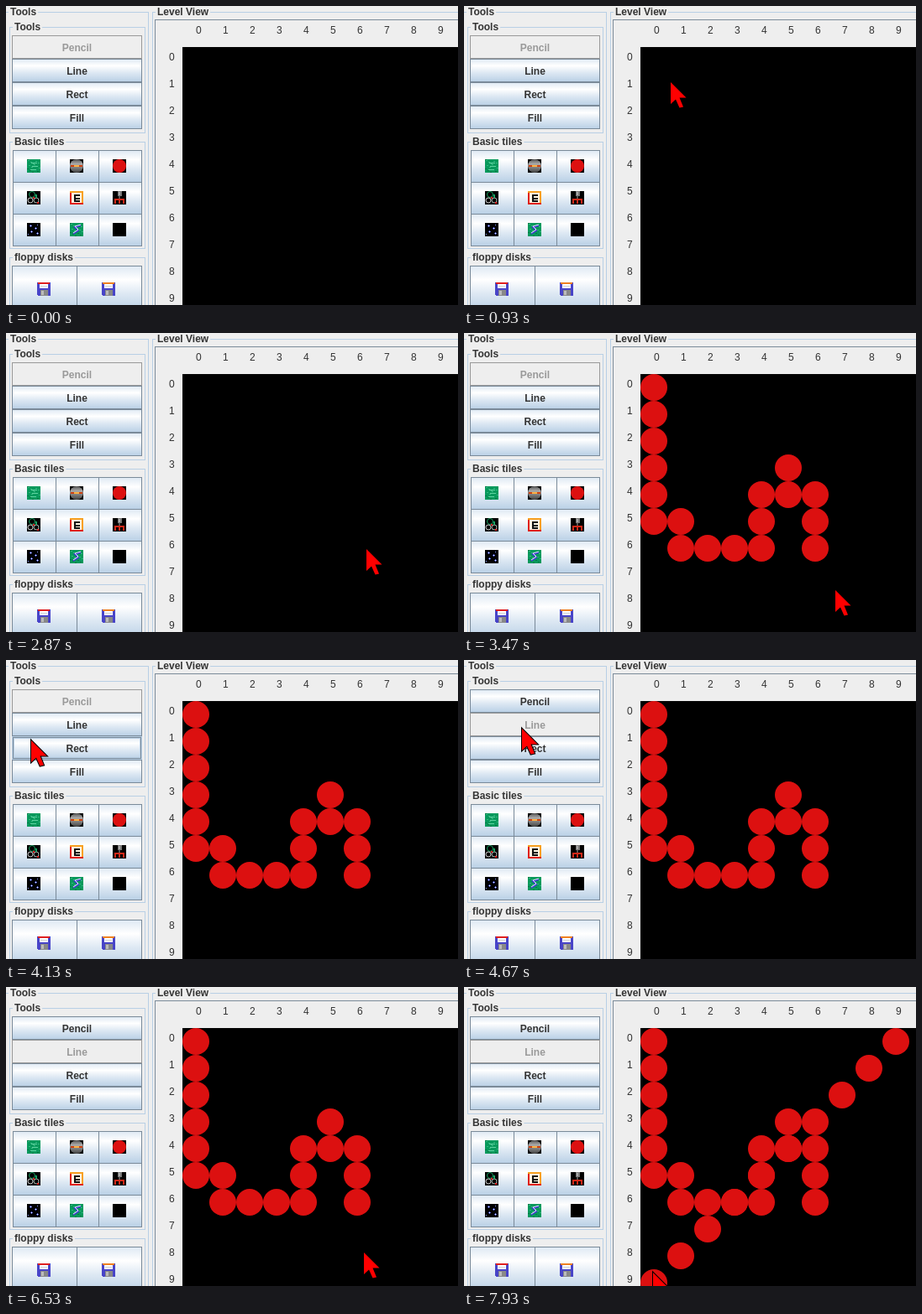
These frames come from a looping animation (538 by 357 pixels, 8 s). An HTML page with a canvas:

```html
<!DOCTYPE html>
<html lang="en">
<head>
<meta charset="utf-8">
<title>Level editor</title>
<style>
html, body { margin: 0; width: 100%; height: 100%; overflow: hidden; background: #eee; }
canvas { display: block; }
</style>
</head>
<body>
<canvas id="stage" width="538" height="357"></canvas>
<script>
const ctx = document.getElementById('stage').getContext('2d');
const LOOP = 8000, TICK = 1000 / 15;
const PALE = '#b8cfe5', EDGE = '#7a8a99', INK = '#333', DIM = '#999', RED = '#dc1010';
const FONT = '"Liberation Sans", Arial, sans-serif';

// Pointer path: tick, x, y; a key without a place holds the last one
const path = [
  [4, 412, 370], [8, 345, 236], [14, 246, 91], [17, 230, 77], [19],
  [22, 223, 132], [24, 224, 192], [27, 263, 253], [30, 320, 263], [32, 343, 253],
  [35, 351, 200], [38, 388, 176], [41, 423, 222], [43, 429, 258], [49],
  [52, 442, 307], [54], [58, 270, 214], [62, 30, 96], [67, 62, 78], [69],
  [72, 112, 96], [76, 350, 108], [81, 521, 57], [83],
  [88, 512, 140], [96, 469, 312], [98, 426, 317], [103, 332, 328], [109, 250, 339],
  [111, 241, 340], [113, 227, 341], [115, 225, 341]
];
path.forEach((p, i) => { if (p.length === 1) p.push(path[i - 1][1], path[i - 1][2]); });

const PENCIL_AT = 46, PRESS_AT = 69, SWITCH_AT = 70, LINE_AT = 119;
const pencilCells = '00 01 02 03 04 05 15 16 26 36 46 45 44 54 53 64 65 66'.split(' ');

const slope = (i, axis) => (path[i + 1][axis] - path[i][axis]) / (path[i + 1][0] - path[i][0]);

// Monotone tangent, so the curve never overshoots a key
function tangent(i, axis) {
  if (i === 0) return slope(0, axis);
  if (i === path.length - 1) return 0;
  const a = slope(i - 1, axis), b = slope(i, axis);
  return a * b > 0 ? 2 * a * b / (a + b) : 0;
}

function pointerAt(tick) {
  const next = path.findIndex(p => p[0] > tick);
  if (next < 0) return path[path.length - 1].slice(1);
  if (next === 0) return path[0].slice(1);
  const i = next - 1, span = path[next][0] - path[i][0];
  const u = (tick - path[i][0]) / span, v = 1 - u;
  return [1, 2].map(axis => Math.round(
    path[i][axis] * v * v * (1 + 2 * u) + path[next][axis] * u * u * (3 - 2 * u) +
    span * u * v * (tangent(i, axis) * v - tangent(next, axis) * u)
  ));
}

function fill(color, x, y, w, h) {
  ctx.fillStyle = color;
  ctx.fillRect(x, y, w, h);
}

function frame(color, x, y, w, h) {
  ctx.strokeStyle = color;
  ctx.lineWidth = 1;
  ctx.strokeRect(x + .5, y + .5, w - 1, h - 1);
}

function disc(color, x, y, r) {
  ctx.fillStyle = color;
  ctx.beginPath();
  ctx.arc(x, y, r, 0, Math.PI * 2);
  ctx.fill();
}

function ring(color, x, y, r) {
  ctx.strokeStyle = color;
  ctx.lineWidth = 1;
  ctx.beginPath();
  ctx.arc(x, y, r, 0, Math.PI * 2);
  ctx.stroke();
}

function text(str, x, y, weight = 'bold', color = INK, align = 'left') {
  ctx.font = `${weight} 12px ${FONT}`;
  ctx.textAlign = align;
  ctx.fillStyle = color;
  ctx.fillText(str, x, y);
}

function panel(title, x, y, w, h, textX) {
  frame(PALE, x, y, w, h);
  ctx.font = `bold 12px ${FONT}`;
  fill('#eee', textX - 2, y, ctx.measureText(title).width + 4, 1);
  text(title, textX, y + 4);
}

function button(x, y, w, h, pointer, state = '') {
  if (state === 'off') {
    fill('#eee', x, y, w, h);
    frame(DIM, x, y, w, h);
    return;
  }
  const g = ctx.createLinearGradient(0, y, 0, y + h);
  g.addColorStop(0, '#dde8f3');
  g.addColorStop(.3, '#fff');
  g.addColorStop(.6, '#dde8f3');
  g.addColorStop(1, PALE);
  fill(state === 'down' ? PALE : g, x, y, w, h);
  const [px, py] = pointer;
  const hover = px >= x && px < x + w && py >= y && py < y + h;
  if (hover && state !== 'down') {
    frame(PALE, x, y, w, h);
    frame(EDGE, x + 1, y + 1, w - 2, h - 2);
    frame(PALE, x + 2, y + 2, w - 4, h - 4);
  } else {
    frame(EDGE, x, y, w, h);
    if (state === 'down') frame(EDGE, x + 1, y + 1, w - 1, h - 1);
  }
}

// 16 px tile icons, drawn from their own top left corner
function board() {
  fill('#08995c', 0, 0, 16, 16);
  for (let i = 0; i < 16; i++) fill(i % 3 ? '#35b980' : '#067444', i * 7 % 15, i * 5 % 16, 2, 1);
}
const black = () => fill('#000', 0, 0, 16, 16);

function chip() {
  board();
  for (const y of [4, 8, 12]) fill('#5fd3a0', 4 + y % 3, y, 7, 1);
}

function boulder() {
  black();
  const g = ctx.createLinearGradient(0, 0, 0, 16);
  g.addColorStop(0, '#555');
  g.addColorStop(.35, '#aaa');
  g.addColorStop(1, '#444');
  disc(g, 8, 8, 8);
  fill('#d04010', 1, 7, 14, 2);
  fill('#ffb040', 5, 7, 6, 2);
}

function redBall() {
  black();
  disc(RED, 8, 8, 8);
}

function atoms() {
  black();
  ring('#18a060', 6, 4, 3.5);
  ring('#ccc', 4, 11, 3);
  ring('#a8b8b0', 11, 11, 3);
  fill('#e02020', 7, 7, 2, 2);
  fill('#e02020', 12, 13, 2, 2);
  fill('#18a060', 10, 4, 2, 4);
}

function exit() {
  fill('#e02010', 0, 0, 16, 16);
  fill('#f8a020', 0, 0, 15, 2);
  fill('#f8a020', 14, 0, 2, 14);
  fill('#fff4e0', 2, 2, 12, 12);
  fill('#111', 5, 4, 2, 9);
  for (const y of [4, 8, 11]) fill('#111', 5, y, 7, 2);
}

function plunger() {
  black();
  fill('#777', 6, 0, 5, 6);
  fill('#aaa', 7, 1, 2, 4);
  fill('#555', 7, 6, 2, 4);
  fill('#d02818', 2, 9, 12, 2);
  for (const x of [2, 7, 12]) fill('#d02818', x, 11, 2, 4);
}

function stars() {
  black();
  for (const [x, y] of [[4, 3], [10, 6], [5, 10], [12, 12]]) {
    fill('#4858e0', x - 1, y, 3, 1);
    fill('#4858e0', x, y - 1, 1, 3);
    fill('#fff', x, y, 1, 1);
  }
  fill('#8898ff', 12, 2, 1, 1);
  fill('#8898ff', 1, 13, 1, 1);
}

function spark() {
  board();
  const zigzag = (color, width, dy) => {
    ctx.strokeStyle = color;
    ctx.lineWidth = width;
    ctx.beginPath();
    ctx.moveTo(13, 3 + dy);
    ctx.lineTo(6, 5 + dy);
    ctx.lineTo(10, 9 + dy);
    ctx.lineTo(4, 13 + dy);
    ctx.stroke();
  };
  zigzag('#4038d0', 2, 0);
  zigzag('#e8e8ff', 1, -1);
}

const icons = [chip, boulder, redBall, atoms, exit, plunger, stars, spark, black];

function floppy(label) {
  fill('#4844c8', 0, 0, 16, 16);
  fill('#fff', 3, 0, 10, 7);
  fill(label, 1, 0, 14, 2);
  fill('#ccc', 4, 4, 8, 1);
  fill('#888', 4, 9, 9, 7);
  fill('#bbb', 5, 10, 3, 5);
  fill('#eee', 0, 15, 1, 1);
}

function icon(x, y, paint) {
  ctx.save();
  ctx.translate(x, y);
  paint();
  ctx.restore();
}

function drawTools(tick, pointer) {
  panel('Tools', -4, 7, 174, 360, 5);
  panel('Tools', 4, 25, 162, 127, 10);
  const off = tick < SWITCH_AT ? 0 : 1;
  ['Pencil', 'Line', 'Rect', 'Fill'].forEach((name, i) => {
    const y = 35 + i * 28;
    const down = i === 1 && tick >= PRESS_AT && tick < SWITCH_AT;
    button(7, y, 155, 28, pointer, i === off ? 'off' : down ? 'down' : '');
    text(name, 84.5, y + 19, 'bold', i === off ? DIM : INK, 'center');
  });

  panel('Basic tiles', 4, 162, 162, 128, 10);
  icons.forEach((paint, i) => {
    const x = 8 + i % 3 * 51, y = 172 + Math.floor(i / 3) * 38;
    button(x, y, 52, 39, pointer);
    icon(x + 17, y + 11, paint);
  });

  panel('floppy disks', 4, 300, 162, 80, 10);
  ['#e02020', '#f08020'].forEach((color, i) => {
    const x = 7 + i * 77;
    button(x, 310, 78, 56, pointer);
    icon(x + 30, 330, () => floppy(color));
  });
}

function drawLevel(tick) {
  panel('Level View', 174, 7, 380, 360, 180);
  frame(EDGE, 177, 16, 380, 360);
  fill('#000', 210, 49, 328, 308);
  for (let i = 0; i < 10; i++) {
    text(i, 226 + i * 32, 33, 'normal');
    text(i, 194, 65 + i * 32, 'normal');
  }
  const ball = (col, row) => disc(RED, 226 + col * 32, 65 + row * 32, 16);
  if (tick >= PENCIL_AT) pencilCells.forEach(c => ball(+c[0], +c[1]));
  if (tick >= LINE_AT) for (let i = 0; i < 10; i++) ball(9 - i, i);
}

function drawPointer([x, y]) {
  ctx.save();
  ctx.translate(x, y);
  ctx.beginPath();
  ctx.moveTo(0, 0);
  ctx.lineTo(0, 26);
  ctx.lineTo(6, 20.5);
  ctx.lineTo(10.5, 30.5);
  ctx.lineTo(15, 29.5);
  ctx.lineTo(10.5, 18.5);
  ctx.lineTo(18.5, 18.5);
  ctx.closePath();
  ctx.lineWidth = 2;
  ctx.strokeStyle = '#000';
  ctx.stroke();
  ctx.fillStyle = '#f00';
  ctx.fill();
  ctx.restore();
}

function draw(now) {
  // Small allowance so rounded times land on the right tick
  const tick = Math.floor((now % LOOP + 4) / TICK) % 120;
  const pointer = pointerAt(tick);
  fill('#eee', 0, 0, 538, 357);
  drawTools(tick, pointer);
  drawLevel(tick);
  drawPointer(pointer);
}

const start = performance.now();
function loop() {
  draw(performance.now() - start);
  requestAnimationFrame(loop);
}
loop();
</script>
</body>
</html>
```
